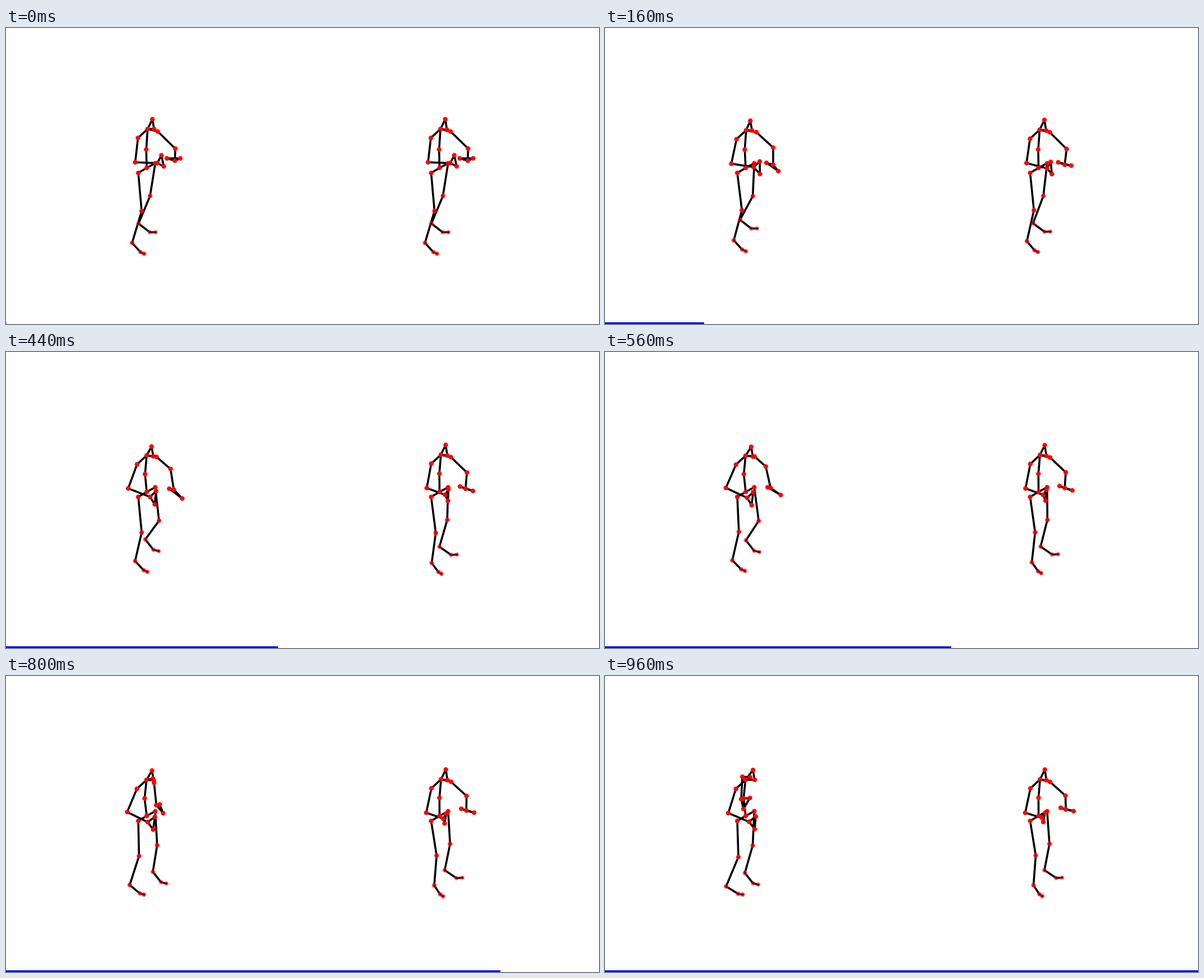
A matplotlib script that plays this animation: 1058 by 529 pixels, repeating every 1 s.

```python
import numpy as np
import matplotlib.pyplot as plt
from matplotlib.animation import FuncAnimation
from matplotlib.patches import Rectangle

W, H, DPI = 1058, 529, 100
FRAMES, STEP_MS = 25, 40
TIME = np.arange(FRAMES)
U = TIME / (FRAMES - 1)

CHAINS = [
    "root hip_r knee_r ankle_r foot_r toe_r",
    "root hip_l knee_l ankle_l foot_l toe_l",
    "root spine thorax head nose thorax",
    "thorax shoulder_r elbow_r wrist_r thumb_r hand_r wrist_r",
    "thorax shoulder_l elbow_l wrist_l thumb_l hand_l wrist_l",
]
TRUNK = "thorax head nose shoulder_r shoulder_l".split()

# points are complex: x + y*1j in pixels from the root joint, y down
START = dict(
    root=0, hip_r=-15 + 9j, hip_l=15.3 - 8.3j,
    knee_r=-9 + 77j, ankle_r=-26 + 134j, foot_r=-11 + 150.5j, toe_r=-4.5 + 153.5j,
    knee_l=6 + 50.2j, ankle_l=-14.5 + 99.5j, foot_l=5.5 + 115j, toe_l=16 + 115j,
    spine=-0.8 - 33j, thorax=1.7 - 69.5j, head=10.2 - 87j, nose=13.2 - 68j,
    shoulder_r=-15.5 - 53.5j, elbow_r=-20.5 - 10j, wrist_r=19 - 8.5j,
    thumb_r=26.3 - 22.5j, hand_r=30.5 - 2.8j,
    shoulder_l=19.7 - 65j, elbow_l=51 - 34.5j, wrist_l=50.3 - 12.8j,
    thumb_l=36 - 17j, hand_l=60 - 17j)

# joints further from the camera are fainter
FADE = dict(hip_r=0.95, hip_l=0.92, knee_r=0.84, knee_l=0.74,
            ankle_r=0.62, foot_r=0.5, toe_r=0.5,
            ankle_l=0.5, foot_l=0.4, toe_l=0.36)


def ease(speed):
    """0 to 1 over the loop, starting at the given speed and ending at rest."""
    return U * U * (3 - 2 * U) + speed * U * (1 - U) ** 2


# a quick drop that is slowly taken back
SAG = 1 - np.exp(-TIME / 3) - U


def curve(keys, points):
    """Cubic Hermite curve through the points, one value per frame."""
    k, p = np.array(keys, float), np.array(points)
    slope = np.gradient(p, k)
    i = np.clip(np.searchsorted(k, TIME, side="right") - 1, 0, len(k) - 2)
    h = k[i + 1] - k[i]
    u = (TIME - k[i]) / h
    return (p[i] + (p[i + 1] - p[i]) * u * u * (3 - 2 * u)
            + h * slope[i] * u * (1 - u) ** 2
            - h * slope[i + 1] * u * u * (1 - u))


class Figure:
    def __init__(self, root):
        self.root = root
        self.pos = {n: np.full(FRAMES, p, complex) for n, p in START.items()}

    def shift(self, names, by, speed):
        for n in names:
            self.pos[n] = START[n] + by * ease(speed)

    def settle(self, name, end, sag=0, speed=2):
        self.pos[name] = START[name] + (end - START[name]) * ease(speed) + sag * SAG

    def path(self, name, points):
        self.pos[name] = curve([0, *points], [START[name], *points.values()])

    def turn_foot(self, side, degrees, size, progress):
        """Carry foot and toe along with the ankle, turning about it."""
        ankle = "ankle" + side
        spin = 1 + (size * np.exp(1j * np.radians(degrees)) - 1) * progress
        for part in ("foot" + side, "toe" + side):
            self.pos[part] = self.pos[ankle] + (START[part] - START[ankle]) * spin

    def draw_on(self, ax):
        self.bones, = ax.plot([], [], color="black", lw=2.6,
                              solid_joinstyle="round")
        colors = [(1, 0, 0, FADE.get(n, 1)) for n in self.pos]
        none = np.zeros(len(colors))
        self.dots = ax.scatter(none, none, s=20, facecolors=colors,
                               edgecolors=colors, linewidths=1.5, zorder=3)

    def show(self, i):
        line = []
        for chain in CHAINS:
            line += [self.pos[n][i] for n in chain.split()] + [np.nan]
        line = np.array(line) + self.root
        self.bones.set_data(line.real, line.imag)
        dots = np.array([p[i] for p in self.pos.values()]) + self.root
        self.dots.set_offsets(np.column_stack([dots.real, dots.imag]))


# left: lively motion, the far arm swings back across the body
left = Figure(251 + 250j)
left.shift(TRUNK, -2 + 5.2j, 3)
left.shift(["spine"], -3 + 1.7j, 2)
left.path("head", {7: 7.5 - 82.5j, 14: 9.8 - 80.5j, 20: 9.5 - 81j, 24: 13 - 82j})
left.pos["nose"] = left.pos["head"] + 3 + 17.5j
left.path("knee_r", {7: -6 + 74.5j, 16: -13.5 + 71j, 24: -13 + 73.5j})
left.path("ankle_r", {7: -19 + 126.5j, 16: -26 + 122j, 24: -35 + 126j})
left.path("knee_l", {11: 22 + 51.5j, 16: 23 + 52j, 24: 12.5 + 53j})
left.path("ankle_l", {11: -2.5 + 85j, 16: 3 + 89.5j, 20: 11 + 100j, 24: -1.5 + 102j})
left.turn_foot("_r", -16, 1.14, U ** 4)
left.turn_foot("_l", 14, 0.93, np.clip((TIME - 7) / 4, 0, 1))
left.path("elbow_r", {7: -29 - 6j, 18: -36 - 7.5j, 24: -31 - 5j})
left.path("wrist_r", {11: 6 + 9j, 17: 0.3 + 11.2j, 24: 6 + 10.5j})
left.path("thumb_r", {4: 25 - 11.5j, 16: 12.5 + 1.5j, 24: 18 + 1j})
left.path("hand_r", {4: 25.5 + 11j, 17: 9.5 + 24.5j, 24: 16 + 23.5j})
left.path("shoulder_l", {11: 17.5 - 62.5j, 24: 8 - 69j})
left.path("elbow_l", {11: 42.5 - 41j, 16: 30 - 49j, 24: -6 - 70j})
left.path("wrist_l", {4: 49 - 5.5j, 16: 38.5 - 10j, 24: -8 - 30j})
left.path("thumb_l", {4: 37 - 9j, 16: 36 - 11j, 24: 7.5 - 32j})
left.path("hand_l", {5: 58 + 10j, 16: 56.5 + 2j, 24: -4 - 12.5j})

# right: the same start, easing into a still pose
right = Figure(773.5 + 250j)
right.shift(TRUNK, 1 + 4.3j, 2)
right.shift(["spine"], 0.7 + 0.7j, 2)
right.settle("knee_r", -5 + 70.5j, speed=1)
right.settle("ankle_r", -9 + 124j)
right.settle("knee_l", 19.5 + 50j, speed=1)
right.settle("ankle_l", 10.5 + 97j, speed=1)
right.turn_foot("_r", 9, 0.86, ease(2))
right.turn_foot("_l", -4, 1, ease(2))
right.settle("elbow_r", -23.8 - 5.5j)
right.settle("wrist_r", 6 + 3.5j, sag=10j)
right.settle("thumb_r", 11.5 - 5.5j, sag=11.5j)
right.settle("hand_r", 8.5 + 11j, sag=17j)
right.settle("elbow_l", 48 - 36j, sag=2j)
right.settle("wrist_l", 48.7 - 11.5j, sag=-5.5 + 12j)
right.settle("thumb_l", 39.5 - 14.5j, sag=-3.5 + 11j)
right.settle("hand_l", 62.5 - 8.5j, sag=-4.5 + 18j)

fig = plt.figure(figsize=(W / DPI, H / DPI), dpi=DPI, facecolor="white")
ax = fig.add_axes([0, 0, 1, 1])
ax.set(xlim=(0, W), ylim=(H, 0))
ax.set_autoscale_on(False)
ax.axis("off")
for body in (left, right):
    body.draw_on(ax)
bar = ax.add_patch(Rectangle((0, H - 3), 1, 3, color="blue", lw=0, snap=False))


def update(i):
    left.show(i)
    right.show(i)
    bar.set_width(0.5 + W * U[i])
    return left.bones, left.dots, right.bones, right.dots, bar


anim = FuncAnimation(fig, update, frames=FRAMES, interval=STEP_MS, repeat=True)
plt.show()
```
